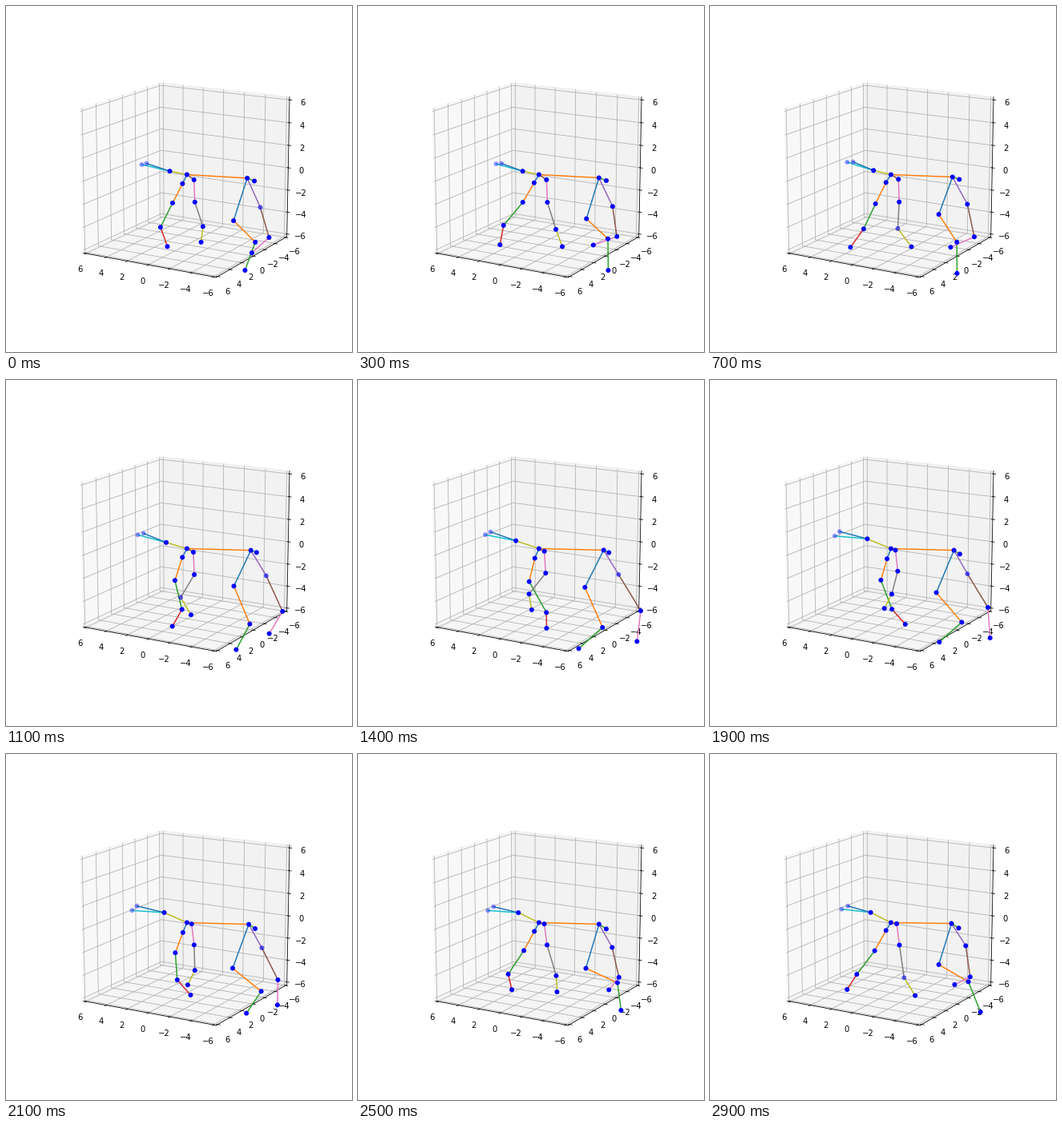
Write a matplotlib script that moves like this. It is 432 by 432 pixels and loops after 3000 ms.

```python
import numpy as np
import matplotlib.pyplot as plt
from matplotlib.animation import FuncAnimation
from matplotlib.colors import to_rgba

SIZE, DPI = 432, 72
FRAMES, STEP = 30, 100
STRIDE = 2.4  # seconds per gait cycle

joints, bones = {}, []


def joint(name, parent, color, rest, cos=0, sin=0, drift=0):
    """Joint circling its rest point once per stride; points are x + yj."""
    joints[name] = rest, cos, sin, drift
    if parent:
        bones.append((parent, name, color))


joint("withers", None, None, 225.9 + 210.5j)

# near front leg
joint("shoulder_l", "withers", "C0", 220.4 + 221.8j, 0, -0.7 - 1.5j)
joint("elbow_l", "shoulder_l", "C1", 210 + 248.4j, -2 - 2.5j, -4 - 2.2j)
joint("wrist_l", "elbow_l", "C2", 209.5 + 282.2j, -16.6 - 6j, -22.7 - 5.7j)
joint("paw_l", "wrist_l", "C3", 209.6 + 302.8j, -8.1 - 5.4j, -37.6 - 4.6j, -2j)

# far front leg
joint("shoulder_r", "withers", "C5", 233.3 + 214.1j, 0, 1.3 + 0.8j, -1 - 2j)
joint("elbow_r", "shoulder_r", "C6", 235.3 + 241.3j, 0.5 - 0.4j, 1.1 + 1.3j, -2.7j)
joint("wrist_r", "elbow_r", "C7", 230.7 + 272.6j, 15.2 + 2.7j, 8 + 6.2j)
joint("paw_r", "wrist_r", "C8", 234.6 + 292.9j, 9 + 2j, 19.9 + 8.5j)

# neck and head
joint("neck", "withers", "C8", 200 + 201.3j, 1.6, 3.2 + 1.5j, -2 - 3.4j)
joint("head_l", "neck", "C9", 163 + 194.7j, 1.4 + 1.8j, 6.2, -3.5 - 1j)
joint("head_r", "neck", "C0", 169.7 + 191.5j, 1 + 1.4j, 7 + 1.6j, -3.2 - 2.5j)

# spine and tail
joint("rump", "withers", "C1", 303.7 + 212.9j, -2.5 + 0.6j, -1.6, -1j)
joint("tail", "rump", "C2", 311.6 + 216.9j, -1.5 + 1.6j, -0.7)

# near hind leg
joint("knee_l", "rump", "C0", 284.1 + 262.8j, 5.3j, 1.6 - 1.3j)
joint("hock_l", "knee_l", "C1", 312 + 298.2j, 6.5 - 7.7j, 1.7 - 7.8j, 5 - 3j)
joint("foot_l", "hock_l", "C2", 298.9 + 329.9j, 14 - 5.7j, 21.4 - 0.6j, 10 - 4j)

# far hind leg
joint("knee_r", "rump", "C4", 321.4 + 244.2j, -3.9 + 1.4j, -1.1 + 0.7j, -4j)
joint("hock_r", "knee_r", "C5", 338.5 + 285.5j, -10.1 - 2.3j, -11.5 - 0.9j, -4j)
joint("foot_r", "hock_r", "C6", 325.8 + 311j, -11.6 - 8.6j, -25.5 - 15.6j, 5 - 4j)

# Joints that fade while turned away: middle of that phase (degrees), limit
FADE = {"knee_r": (262, -0.25), "wrist_r": (120, 0.5)}


def position(name, t):
    rest, cos, sin, drift = joints[name]
    phase = 2 * np.pi * t / STRIDE
    p = rest + cos * np.cos(phase) + sin * np.sin(phase) + drift * (t - 1.45)
    return p.real, p.imag


def opacity(name, t):
    if name.startswith("head"):
        return 0.3
    if name in FADE:
        middle, limit = FADE[name]
        if np.cos(np.radians(360 * t / STRIDE - middle)) > limit:
            return 0.51
    return 1


fig = plt.figure(figsize=(SIZE / DPI, SIZE / DPI), dpi=DPI, facecolor="white")

box = fig.add_axes([0.125, 0.125, 0.775, 0.755], projection="3d")
box.apply_aspect = lambda *args: None  # keep the slightly wide frame
box.set_box_aspect((1, 1, 1), zoom=0.94676)
box.view_init(elev=15, azim=120)
box.set(xlim=(-6.25, 6.25), ylim=(-6.25, 6.25), zlim=(-6.25, 6.25))
for axis in (box.xaxis, box.yaxis, box.zaxis):
    axis.set_ticks(range(-6, 7, 2))

stage = fig.add_axes([0, 0, 1, 1])
stage.set(xlim=(0, SIZE), ylim=(SIZE, 0))
stage.axis("off")
lines = [stage.plot([], [], color=color, lw=1.5)[0] for _, _, color in bones]
dots = stage.scatter([0] * len(joints), [0] * len(joints), s=20,
                     color="b", edgecolors="face", linewidths=1.5, zorder=3)


def update(frame):
    t = frame * STEP / 1000
    at = {name: position(name, t) for name in joints}
    for line, (a, b, _) in zip(lines, bones):
        line.set_data(*zip(at[a], at[b]))
    dots.set_offsets(list(at.values()))
    dots.set_facecolors([to_rgba("b", opacity(name, t)) for name in joints])
    return [*lines, dots]


anim = FuncAnimation(fig, update, frames=FRAMES, interval=STEP,
                     repeat=True, repeat_delay=0, blit=False)
plt.show()
```
